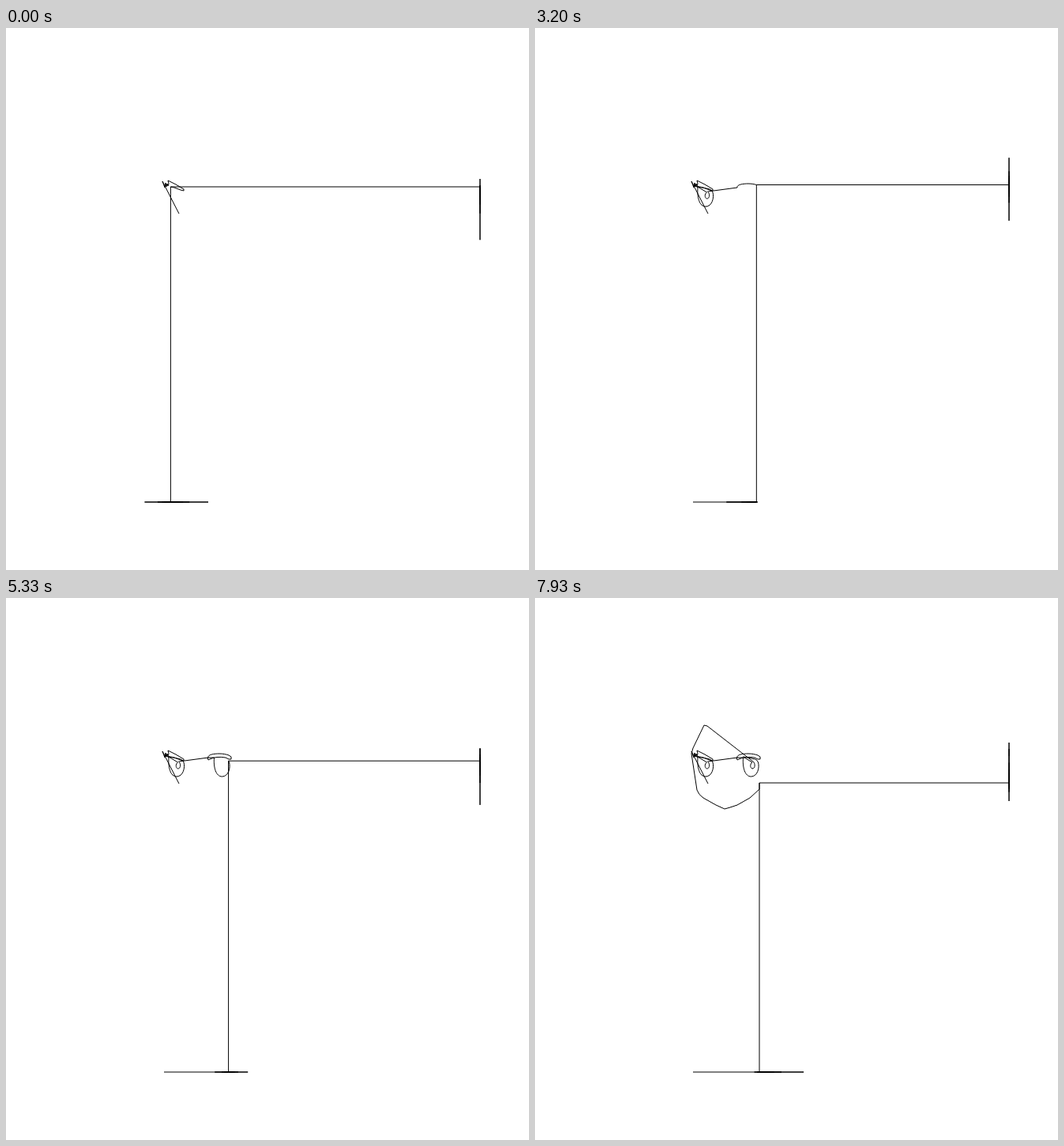
Animation of 662 by 686 pixels, one loop 8 s. Source, as an HTML page with a canvas:

```html
<!DOCTYPE html>
<html lang="en">
<head>
<meta charset="utf-8">
<title>Plotter</title>
<style>
html, body { margin: 0; width: 100%; height: 100%; overflow: hidden; background: #fff; }
canvas { display: block; }
</style>
</head>
<body>
<canvas width="662" height="686"></canvas>
<script>
const LOOP = 8000, FRAMES = 120;
const ctx = document.querySelector('canvas').getContext('2d');

const eye = x => `L${x} 202c-1 12 2 24 10 24c8 0 11-11 9-18q-1-3-4-4q-8-2-15-3`;
const pupil = x => `M${x} 208c-3 2-3 7 0 8c4 0 4-7 1-9`;
const scribble = 'M219 235L198 194 201 202 202 196 203 201 204 197 205 200 206 197 205 193 215 198 225 204 225 206 221 205 213 202 208.4 201';
const brow = 'M256 202C255 198 264 197 270 197C275 197 279 198 282 199L285 201 285 204 282 204 278 202Q266 200 258 204L256 205 255 202';
const face = 'M218 162L214 161 200 190 198 197 205 243Q207 249 213 253L229 262 240 267 247 265 256 262 272 253 284 242 284 234';

// [frames, path]; the pen spends one more frame moving on to the next path
const plan = [
  [28, 'M208.4 201L202 200 201 198' + eye(206)],
  [9, pupil(217.5)],
  [23, brow],
  [23, 'M263 202' + eye(263.5)],
  [11, pupil(275)],
  [20, face]
];

const strokes = [];
let clock = 0;

function addStroke(frames, d) {
  const path = document.createElementNS('http://www.w3.org/2000/svg', 'path');
  path.setAttribute('d', d);
  strokes.push({ path, shape: new Path2D(d), length: path.getTotalLength(), from: clock, frames });
  clock += frames;
}

for (const [frames, d] of plan) {
  const last = strokes.at(-1);
  if (last) {
    const end = last.path.getPointAtLength(last.length);
    addStroke(1, `M${end.x} ${end.y}L${d.slice(1).match(/^[\d.]+ [\d.]+/)[0]}`);
  }
  addStroke(frames, d);
}

function line(x1, y1, x2, y2) {
  ctx.beginPath();
  ctx.moveTo(x1, y1);
  ctx.lineTo(x2, y2);
  ctx.stroke();
}

// Joints swing to both sides of the pen, ever closer; overlaps darken the line
function chain(base, pivot, near, far, pen) {
  const joints = [base, pivot];
  for (let i = 0; i < 16; i++) {
    const side = i % 2 ? near : far;
    joints.push(pen + (side - pen) / (1 + (i >> 1)));
  }
  return [...joints, pen];
}

function drawChain(joints, segment) {
  joints.slice(1).forEach((joint, i) => segment(joints[i], joint));
}

function render(f) {
  ctx.clearRect(0, 0, 662, 686);
  ctx.setLineDash([]);
  ctx.stroke(new Path2D(scribble));

  let pen = strokes[0].path.getPointAtLength(0);
  for (const { path, shape, length, from, frames } of strokes) {
    if (f <= from) break;
    const done = length * Math.min(1, (f - from) / frames);
    ctx.setLineDash(done < length ? [done, length + 9] : []);
    ctx.stroke(shape);
    pen = path.getPointAtLength(done);
  }
  ctx.setLineDash([]);

  const { x, y } = pen;
  line(x, 600, x, y);
  line(600, y, x, y);

  const right = Math.max(x, 256 + 85 * (f / FRAMES) ** 1.3);
  const left = x - Math.max(0, 18 + 20 * Math.cos((f - 48) * 2 * Math.PI / 43));
  const wave = Math.cos((f - 9) * 2 * Math.PI / 88);
  const top = Math.min(y, 183 + 20 * wave), bottom = Math.max(y, 257 + 14 * wave);
  drawChain(chain(200, 256, left, right, x), (a, b) => line(a, 600, b, 600));
  drawChain(chain(200, 191, top, bottom, y), (a, b) => line(600, a, 600, b));
}

function tick() {
  const t = performance.now() % LOOP;
  render(Math.min(FRAMES - 1, Math.floor((t + 4) * FRAMES / LOOP)));
  requestAnimationFrame(tick);
}
tick();
</script>
</body>
</html>
```
